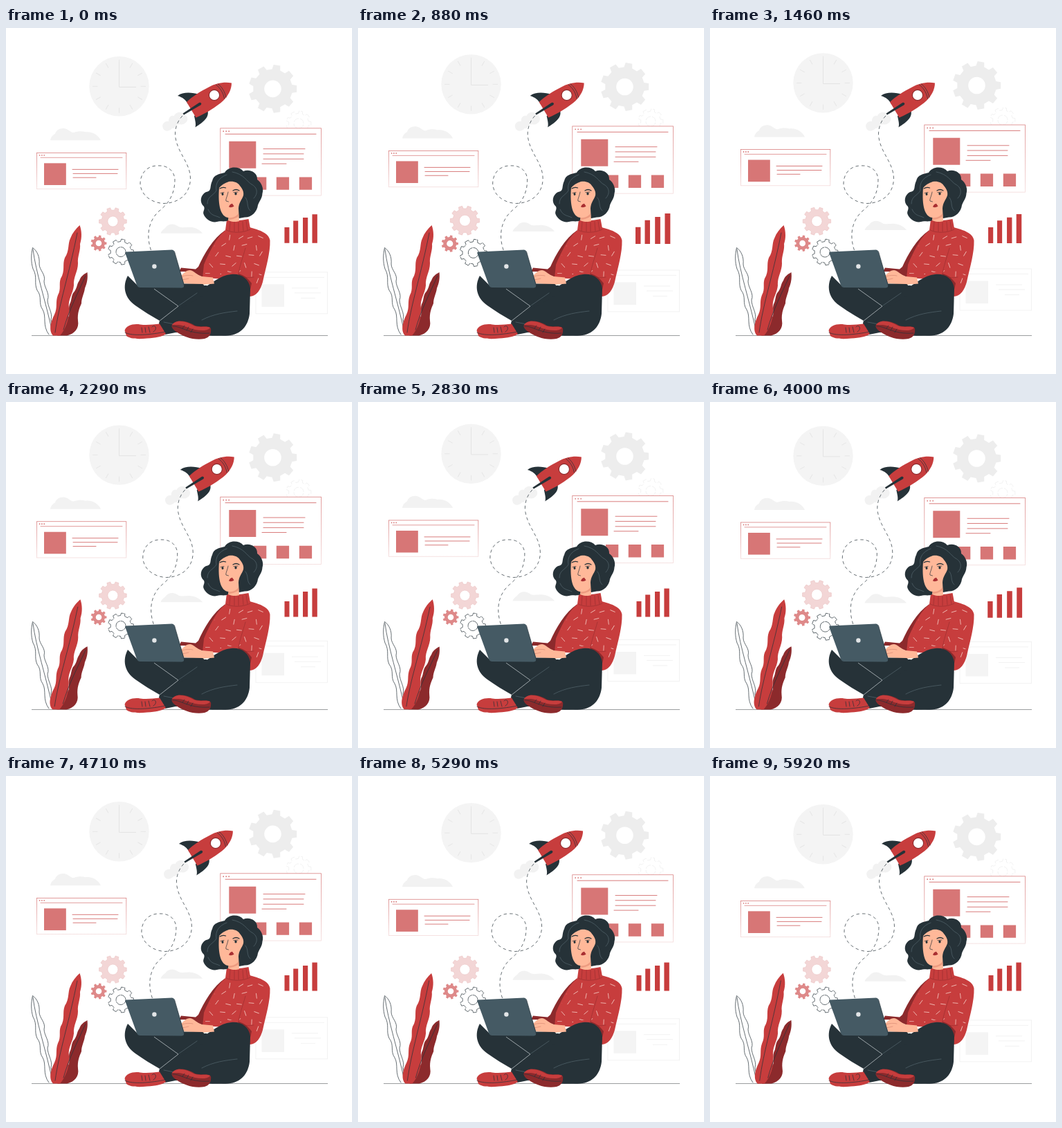
An HTML page that plays this animation: 500 px wide and 500 px high, repeating every 5.96 s.

```html
<!DOCTYPE html>
<html lang="en">
<head>
<meta charset="utf-8">
<title>Launch</title>
<style>
html, body { margin: 0; width: 100%; height: 100%; overflow: hidden; background: #fff; }
svg { display: block; width: 100vw; height: 100vh; }
.red { fill: #c73d3d; }
.deep { fill: #8c2a2c; }
.rose { fill: #d77676; }
.dark { fill: #263238; }
.skin { fill: #ffb899; }
.pale { fill: #f2f2f2; }
.line { fill: none; stroke: #263238; stroke-width: .7; stroke-linecap: round; stroke-linejoin: round; }
.bold { stroke-width: 1.3; }
.knit { stroke: #9b3032; }
.seam { stroke: #5d6f78; stroke-width: .6; }
.frame { fill: #fff; stroke: url(#fade); stroke-width: .8; }
.rule { fill: none; stroke: #cf5a5a; stroke-width: .8; stroke-linecap: round; }
.faint { fill: none; stroke: #efefef; stroke-width: .8; }
.trail { stroke-dasharray: 4.5 4; stroke-linecap: butt; }
</style>
</head>
<body>
<svg viewBox="0 0 500 500" xmlns="http://www.w3.org/2000/svg">
  <defs>
    <linearGradient id="fade" x2="0" y2="1">
      <stop stop-color="#d98080"/>
      <stop offset=".5" stop-color="#e6abab"/>
      <stop offset="1" stop-color="#f3dada"/>
    </linearGradient>
    <clipPath id="knit">
      <path d="M320 294C308 300 296 322 289 344L288 355L312 356L336 350L352 374L364 372C373 350 377 329 377 306C375 297 364 294 352 294Z"/>
    </clipPath>
  </defs>

  <g class="float">
    <circle cx="163.5" cy="84.4" r="43.2" fill="#f4f4f4"/>
    <g id="ticks" stroke="#e6e6e6" stroke-width="1"></g>
    <path d="M163.5 49V85.5H188" fill="none" stroke="#e3e3e3" stroke-width="1"/>
    <path id="bigGear" fill="#ededed" fill-rule="evenodd"/>
    <path id="ghostGear" class="faint" stroke-dasharray="9 2"/>
    <path class="pale" d="M64 162.5C65 157 68 155 71 153C73 146 82 143 89 147C94 150 95 152 99 151C104 149 110 149 115 150.500C124 149 134 155 137 162.5Z"/>
    <path class="pale" d="M223.5 297C225 292 229 291 231 288C236 282 244 283 249 287C254 290 261 287 267 288C276 289 281 293 284 297Z"/>

    <rect class="frame" x="44.4" y="180.5" width="129.4" height="52.3"/>
    <path class="rule" d="M50 187.4H168" opacity=".75"/>
    <g id="dotsA" class="rose"></g>
    <rect class="rose" x="55" y="195.5" width="31.8" height="31.6"/>
    <path class="rule" d="M96 204.5H162M97 210.5H161M97 216.3H130"/>

    <rect class="frame" x="309.8" y="145" width="145.8" height="97.2"/>
    <path class="rule" d="M317 153.4H448"/>
    <g id="dotsB" class="rose"></g>
    <path class="rose" d="M322.3 163.8h39v39h-39zM358 215.6h18.3v18.4H358zM390.8 215.6h18.3v18.4h-18.3zM423.8 215.6h18.3v18.4h-18.3z"/>
    <path class="rule" d="M372 174.8H432M372 182H430M372 189.4H430M370 196.3H405"/>

    <g class="faint">
      <rect x="361" y="353" width="103.6" height="60"/>
      <path d="M366 360.5H460M413 376H451M417 383H455M426 390.5H447"/>
    </g>
    <rect x="369.5" y="370.5" width="32.5" height="32.5" fill="#f4f4f4"/>
  </g>

  <g id="bars" class="red">
    <path d="M402.5 288h7v22.6h-7zM415.2 278.5h7v32.1h-7zM429 274h7.2v36.6H429zM442.4 269.4h7.4v41.2h-7.4z"/>
  </g>

  <g id="gears">
    <path id="pinkGear" fill="#f3d6d6" fill-rule="evenodd" stroke="#e9bcbc" stroke-width=".5"/>
    <path id="roseGear" fill="#de8989" fill-rule="evenodd"/>
    <path id="wireGear" class="line" stroke-dasharray="11 1.5"/>
  </g>

  <g id="rocket">
    <path class="pale" d="M227 145C224 139 230 134 235 135C235 128 239 126 243 127C246 120 255 121 257 125C264 127 264 135 258 138C255 141 250 138 247 140C245 144 242 145 240 145C236 150 229 150 227 145Z"/>
    <path class="line trail" d="M209.5 321C202 299 206 277 223 263C239 250 244 235 244 219C243 205 232 198 219 199C203 199 194 211 194 225C195 243 212 253 228 253.5C250 253 266 240 266.500 218C266.500 194 247 181 244.500 155C244 142 250 131 257 125"/>
    <g transform="translate(-1 0)">
      <path class="dark" d="M249 98C257 92 269 93 281 96L264 110C261 104 256 100 249 98ZM292 118C296 129 286 136 274.5 143.500C276 138 274 133 273 127Z"/>
      <path class="red" d="M262 107C270 99 283 91 294 85.5C304 80 316 77.5 327 79.500C327 89 322 98 315 105C305 114 289 124 275.5 129.500Z"/>
      <path class="line" d="M304.500 82C310 86 315 93 316.5 102M307.500 81C313 85 317 92 319 100"/>
      <circle cx="302" cy="97" r="7.6" fill="#fff" stroke="#8c2a2c" stroke-width="1.1"/>
      <path class="dark" d="M256.500 123.500L280 108C283 107 284.500 110 282 111.5L258 125.500Z"/>
    </g>
  </g>

  <path d="M37 444.5H465" stroke="#808487" stroke-width=".8"/>

  <g class="line">
    <path d="M62 443C52 430 59 417 53 407C46 397 53 389 45 379C40 368 46 360 39 348C36 338 36 328 38.5 317.500C45 322 49 331 48 341C48 350 58 356 55 366C55 375 64 384 60 393C60 403 68 412 65 421C66 431 71 437 69 443"/>
    <path d="M39 320C43 353 58 397 67 440"/>
  </g>
  <g id="plant">
    <path class="deep" d="M74 444.5C82 438 85 426 91 416C92 410 90 405 92 399C95 394 94 388 97 383C103 377 102 370 106 365C108 359 112 356 117.5 353C118.5 362 117 369 114 376C113 384 109 390 109 398C106 405 103 412 104 423C106 434 99 442 88 444.5Z"/>
    <path class="red" d="M68 444.5C61 437 65 424 70 414C75 404 71 396 75 386C80 377 76 370 79 362C86 351 81 342 85 332C92 322 89 312 93 304C96 296 101 290 106.500 285C109.500 293 110 303 107 312C108 322 103 330 104 340C104 352 97 360 98 372C97 384 89 392 91 405C92 420 86 436 78 444.5Z"/>
    <path class="line" d="M71 440C77 397 91 357 103 296M83 436C91 407 104 383 115 358"/>
  </g>

  <path class="dark" d="M176 358C168 373 171 390 187 401C198 409 210 416 222 423L256 437C272 444 294 446 312 444L310 400L290 372L192 374Z"/>
  <path class="deep" d="M317 292C299 304 286 327 278 345L274 348.5L253 346.5L250 352L267 352L284 360L304 352Z"/>
  <path class="red" d="M319 291C306 299 295 321 286 342L284 361L337 364L352 388C362 388 368 378 371 367C376 344 382 325 381.5 307C380 296 366 292 352 288Z"/>
  <path class="red" d="M319 277C331 279 342 278 350.5 276L353.5 292C343 297 328 297 317 292Z"/>
  <path class="line knit" d="M324 280L323 293M330 281V294M336 281V294M342 280L343 293M347 279L349 292M318 292C328 297 343 296 353 291"/>
  <g id="marks" clip-path="url(#knit)" stroke="#f4c9c2" stroke-width=".8" stroke-linecap="round"></g>
  <path class="line knit" d="M346 318C342 333 337 345 336 356C342 360 349 362 358 360"/>
  <path class="deep" d="M335 355C343 356 350 362 355 369L352 382C347 373 342 364 335 355Z"/>

  <path class="dark" d="M353 376C351 362 339 354 325 356C309 358 298 368 284 377L222 423C219 431 223 440 230 443L245 440C270 439 296 446 321 444.5C340 443 350 430 352 413Z"/>
  <path class="dark" d="M216 374H300L278 391L248 407Z"/>
  <path class="line seam" d="M250 401L276 383M334 409C317 411 300 413 283 422M228 425L264 432"/>
  <path d="M214 377L249 402L221 424" fill="none" stroke="#b9c1c5" stroke-width=".8"/>

  <path class="red" d="M171.500 437C174 430 183 427 194 428.500C205 430 213 428 222 427.5L231 442C226 446 216 448 204 448.5C190 450 179 449 174 445Z"/>
  <path class="line" d="M172 440C182 446 211 443 230 439M196 433L197 440M201 433L202 440M206 432L208 440M211 432C215 427 220 435 213 439"/>
  <path class="deep" d="M239.5 430C245 420 262 423 273 430C284 433 292 429 296 434C297 442 294 447 287 449C272 452 256 446 246 439C242 436 239 433 239.5 430Z"/>
  <path class="red" d="M240 429C246 420 261 424 271 430C281 434 288 430 295 433C290 440 273 437 261 432C252 428 246 429 240 429Z"/>
  <path class="line" d="M241 431C252 430 264 443 294 441M258 430L255 434M264 432L261 437M270 435L267 440"/>

  <path class="skin" d="M252 359C256 355 260 350 266 350C272 351 276 357 283 359L299 360.5L301 369.5L284 371L256 369Z"/>
  <path class="line" style="stroke:#d88b74" d="M254 359C260 357 266 357 270 358M255 364L264 362"/>
  <path class="dark" d="M192 374L257 369.5L284 370C287 371 287 376 284 376.5L194 376Z"/>
  <path d="M173.5 323.5L240 320.5Q242.5 320.5 243.3 323L257 369Q258.5 375.5 254 375.5L194 375Q190.5 375 189 371.5L172.5 326Q171.7 323.7 173.5 323.5Z" fill="#455a64"/>
  <path class="line" d="M243.5 323L258 374"/>
  <circle cx="214.4" cy="344.5" r="3.2" fill="#e2e5e7"/>

  <path class="dark" d="M316 209C321 200 336 199 343 207C352 203 364 209 363 219C369 223 373 232 370.500 239C370 247 366 250 364 256C363 266 354 274 345 273.500L321 278C315 281 310 278 305 280C297 282 288 276 285.500 269C284 265 288 262 286 258C279 252 281 241 289 237C298 236 294 229 298 221C300 212 308 211 316 209Z"/>
  <path class="skin" d="M308 231C311 227 316 224 322 222C329 221 335 223 338 228C342 233 344 237 343 242C341 248 336 253 336 261L337 279C332 281 325 280 321 278L321.5 274C310 273 306 256 308 231Z"/>
  <path fill="#ed9b80" d="M321.5 274C327 275 333 272 336 268L336.5 272C331 276 325 277 321.5 277Z"/>
  <path class="line bold" d="M309 232C312 230 315 230 317.5 231M328 235C331 233 334 233 337 235"/>
  <path class="line" d="M321 237C320 243 317 248 318 250L321.5 251"/>
  <ellipse class="dark" cx="313" cy="240" rx="1.5" ry="1.9"/>
  <ellipse class="dark" cx="332" cy="239.5" rx="1.6" ry="1.9"/>
  <path class="line" d="M310 238.5L315 237.5M329 237.5L335 237"/>
  <path fill="#a92f32" d="M322 258.5C323 255.5 325 254 327 253.8L329.5 257.5C327 259.5 324 259.5 322 258.5Z"/>
  <path class="line seam" d="M319 212C308 216 302 224 304 235C299 243 291 243 291 254M327 208C344 211 348 222 355 226C363 230 365 239 358 246M346 245C351 251 347 259 353 264M292 262C296 272 304 271 309 274"/>
</svg>
<script>
const $ = id => document.getElementById(id);
const TAU = Math.PI * 2;
const LOOP = 5960, CYCLE = 6000, START = 40;

// Gear outline with trapezoid teeth and a round hole.
function gear(cx, cy, outer, root, hole, teeth) {
  const pts = [];
  for (let i = 0; i < teeth; i++) {
    for (const [at, r] of [[-.3, root], [-.2, outer], [.2, outer], [.3, root]]) {
      const a = (i + at) / teeth * TAU;
      pts.push((cx + r * Math.cos(a)).toFixed(2) + ' ' + (cy + r * Math.sin(a)).toFixed(2));
    }
  }
  return `M${pts.join('L')}ZM${cx + hole} ${cy}a${hole} ${hole} 0 1 0 ${-2 * hole} 0a${hole} ${hole} 0 1 0 ${2 * hole} 0Z`;
}

$('bigGear').setAttribute('d', gear(385.5, 88, 35, 28.5, 12.3, 9));
$('ghostGear').setAttribute('d', gear(423, 138, 18, 14.5, 7, 9));
$('pinkGear').setAttribute('d', gear(154.4, 279.6, 20, 16.4, 7.5, 10));
$('roseGear').setAttribute('d', gear(134, 311, 11.5, 9, 4.3, 9));
$('wireGear').setAttribute('d', gear(166, 323.5, 18.5, 15, 7, 9));

let ticks = '';
for (let i = 0; i < 12; i++) {
  ticks += `<path d="M31 0H38.5" transform="translate(163.5 84.4) rotate(${i * 30})"/>`;
}
$('ticks').innerHTML = ticks;

const dots = (x, y, gap) => [0, 1, 2].map(i => `<circle cx="${x + i * gap}" cy="${y}" r=".9"/>`).join('');
$('dotsA').innerHTML = dots(48.6, 184, 3.3);
$('dotsB').innerHTML = dots(314.2, 149.4, 4);

// Knit flecks on a jittered grid.
let seed = 17;
const rand = () => (seed = seed * 16807 % 2147483647) / 2147483647;
let marks = '';
for (let row = 0; row < 6; row++) {
  for (let col = 0; col < 6; col++) {
    const x = 288 + col * 16 + (row % 2) * 8 + rand() * 4;
    const y = 300 + row * 13 + rand() * 5;
    marks += `<path d="M-3.5 0H3.5" transform="translate(${x} ${y}) rotate(${rand() * 180})"/>`;
  }
}
$('marks').innerHTML = marks;

const ease = p => (1 - Math.cos(Math.PI * p)) / 2;
const linear = p => p;

// Interpolates a list of [position, value] steps.
function track(steps, p, curve = linear) {
  let i = 1;
  while (i < steps.length - 1 && p > steps[i][0]) i++;
  const [a, from] = steps[i - 1], [b, to] = steps[i];
  return from + (to - from) * curve((p - a) / (b - a));
}

const SHAKE = [0, -1, 2, -4, 4, -4, 4, -4, 2, -1, 0].map((x, i) => [i / 10, x]);
const BEAT = [[0, 1], [.3, 1.065], [.58, 1], [1, 1]];
const SWAY = [[0, 0], [.3, 0], [.4, .7], [.56, 1], [.78, 0], [1, -.6]];
const floats = document.querySelectorAll('.float');

const scaleAt = (s, x, y) => `translate(${x} ${y}) scale(${s}) translate(${-x} ${-y})`;

function draw(ms) {
  const time = ms % LOOP + START;
  const p = time / CYCLE;
  const lift = -10 * (1 - Math.abs(1 - 2 * p));
  const beat = track(BEAT, time % 3000 / 3000);
  floats.forEach(el => el.setAttribute('transform', `translate(0 ${lift})`));
  $('bars').setAttribute('transform', scaleAt(beat, 426, 290));
  $('gears').setAttribute('transform', scaleAt(beat, 153.5, 301));
  $('rocket').setAttribute('transform', `translate(${track(SHAKE, p, ease)} 0)`);
  $('plant').setAttribute('transform', `rotate(${track(SWAY, p)} 88 365)`);
}

const begin = performance.now();
function tick() {
  draw(performance.now() - begin);
  requestAnimationFrame(tick);
}
draw(0);
requestAnimationFrame(tick);
</script>
</body>
</html>
```
